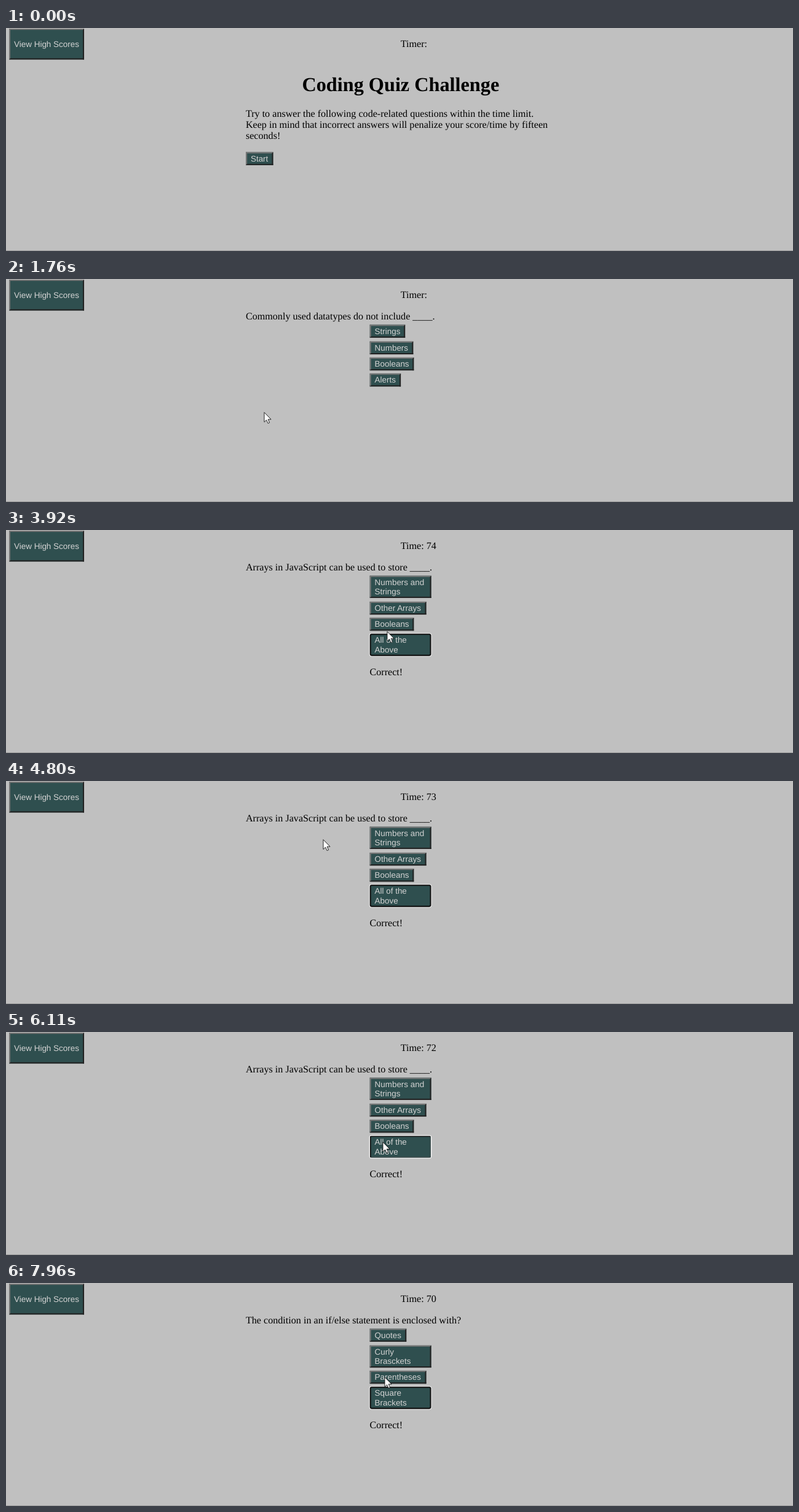
These frames come from a looping animation (1280 by 364 pixels, 8 s). An HTML page:

```html
<!DOCTYPE html>
<html lang="en">
<head>
<meta charset="utf-8">
<title>Coding Quiz Challenge</title>
<style>
  html, body { margin: 0; width: 100%; height: 100%; overflow: hidden; background: #c0c0c0; }
  #page {
    position: absolute; left: 0; top: 0; width: 1270px; height: 361px;
    transform: scale(1.008); transform-origin: 0 0;
    font: 16px/18px "Liberation Serif", "Times New Roman", serif;
    color: #000; text-rendering: geometricPrecision; white-space: pre;
  }
  #page > * { position: absolute; margin: 0; }
  button {
    display: block; box-sizing: border-box; margin: 0 0 5.25px; padding: 1px 6px;
    width: fit-content; max-width: 99.5px;
    border: 2px solid; border-color: #767676 #222 #222 #767676; border-radius: 0;
    background: #2f4f4f; color: #d3d3d3; text-align: left; white-space: normal;
    font: 13.333px/15px "Liberation Sans", Arial, sans-serif;
    text-rendering: geometricPrecision;
  }
  .focus { border-color: #101010; border-radius: 3px; box-shadow: 0 0 0 1px #f4f4f4; }
  .press { border-color: #101010 #3c4c4c #3c4c4c #101010; }
  #scores { left: 5px; top: 1px; height: 50px; max-width: none; white-space: nowrap; }
  #timer { left: 636.6px; top: 18.4px; }
  h1 { left: 477.6px; top: 73.2px; font: bold 32px/36px "Liberation Serif", "Times New Roman", serif; }
  #intro, #start, #question { left: 386.8px; }
  #intro { top: 130.8px; }
  #start { top: 200.5px; }
  #question { top: 52.1px; }
  #answers, #verdict { left: 586.8px; }
  #answers { top: 74.4px; width: 99.5px; }
  #verdict { top: 221.9px; }
  #edge { position: absolute; left: 0; top: 363px; width: 1280px; height: 1px; background: #9a9a9a; }
  #cursor { position: absolute; left: 0; top: 0; overflow: visible; }
</style>
</head>
<body>
<div id="page">
  <button id="scores">View High Scores</button>
  <div id="timer"></div>
  <h1 class="home">Coding Quiz Challenge</h1>
  <p id="intro" class="home">Try to answer the following code-related questions within the time limit.
Keep in mind that incorrect answers will penalize your score/time by fifteen
seconds!</p>
  <button id="start" class="home">Start</button>
  <div id="question"></div>
  <div id="answers"></div>
  <div id="verdict"></div>
</div>
<div id="edge"></div>
<svg id="cursor" width="13" height="20">
  <path d="M1 .7V16.5L4.6 13.1 7.1 18.6 9.6 17.5 7.2 12.1H12.1Z" fill="#fff" stroke="#111" stroke-width=".9"/>
</svg>
<script>
const LOOP = 8000, STEP = 77;
const $ = id => document.getElementById(id);

const quiz = [
  { at: 1760, press: 3850, ask: "Commonly used datatypes do not include ____.",
    options: ["Strings", "Numbers", "Booleans", "Alerts"] },
  { at: 3920, press: 6110, ask: "Arrays in JavaScript can be used to store ____.",
    options: ["Numbers and Strings", "Other Arrays", "Booleans", "All of the Above"] },
  { at: 6260, press: LOOP, ask: "The condition in an if/else statement is enclosed with?",
    options: ["Quotes", "Curly Brasckets", "Parentheses", "Square Brackets"] }
];

// Each move eases on from the last one, bent towards "via" if given
const entry = [1150, 350];
const moves = [
  { at: 70, steps: 11, to: [422, 222] },
  { at: 920, steps: 3, to: [419, 217] },
  { at: 2220, steps: 11, to: [601, 169] },
  { at: 3070, steps: 4, to: [619, 165] },
  { at: 4400, steps: 11, to: [569, 84], via: [440, 75] },
  { at: 5250, steps: 11, to: [612, 179], via: [633, 97] },
  { at: 6420, steps: 11, to: [566, 80], via: [320, 32] },
  { at: 7260, steps: 10, to: [615, 153] }
];

const smooth = u => u * u * (3 - 2 * u);
const mix = (a, b, u) => a.map((v, i) => v + (b[i] - v) * u);

function pointerAt(t) {
  t += 7; // step times are rounded to 10 ms
  const i = moves.findLastIndex(m => m.at <= t);
  if (i < 0) return null;
  const { at, steps, to, via } = moves[i];
  const from = i ? moves[i - 1].to : entry;
  const step = Math.min(steps, Math.floor((t - at) / STEP) + 1);
  const u = smooth(step / steps);
  const point = via ? mix(mix(from, via, u), mix(via, to, u), u) : mix(from, to, u);
  return point.map(Math.round);
}

function makeButton(label) {
  const button = document.createElement("button");
  button.textContent = label;
  return button;
}

let shown;
function showQuestion(index) {
  if (index === shown) return;
  shown = index;
  const item = quiz[index];
  document.querySelectorAll(".home").forEach(el => el.style.display = item ? "none" : "");
  $("question").textContent = item ? item.ask : "";
  $("verdict").textContent = index > 0 ? "Correct!" : "";
  $("answers").replaceChildren(...(item ? item.options.map(makeButton) : []));
}

function draw(t) {
  const index = quiz.findLastIndex(q => q.at <= t);
  showQuestion(index);
  $("start").classList.toggle("focus", t >= 1590);
  const last = $("answers").lastElementChild;
  if (last) {
    const pressed = t >= quiz[index].press;
    last.classList.toggle("focus", index > 0 || pressed);
    last.classList.toggle("press", pressed);
  }

  const seconds = Math.floor((t - 2690) / 1000);
  $("timer").textContent = seconds < 0 ? "Timer:" : "Time: " + (75 - seconds);

  const pos = pointerAt(t);
  $("cursor").style.display = pos ? "" : "none";
  if (pos) $("cursor").style.transform = `translate(${pos[0]}px, ${pos[1]}px)`;
}

const begin = performance.now();
function tick() {
  draw((performance.now() - begin) % LOOP);
  requestAnimationFrame(tick);
}
tick();
</script>
</body>
</html>
```
